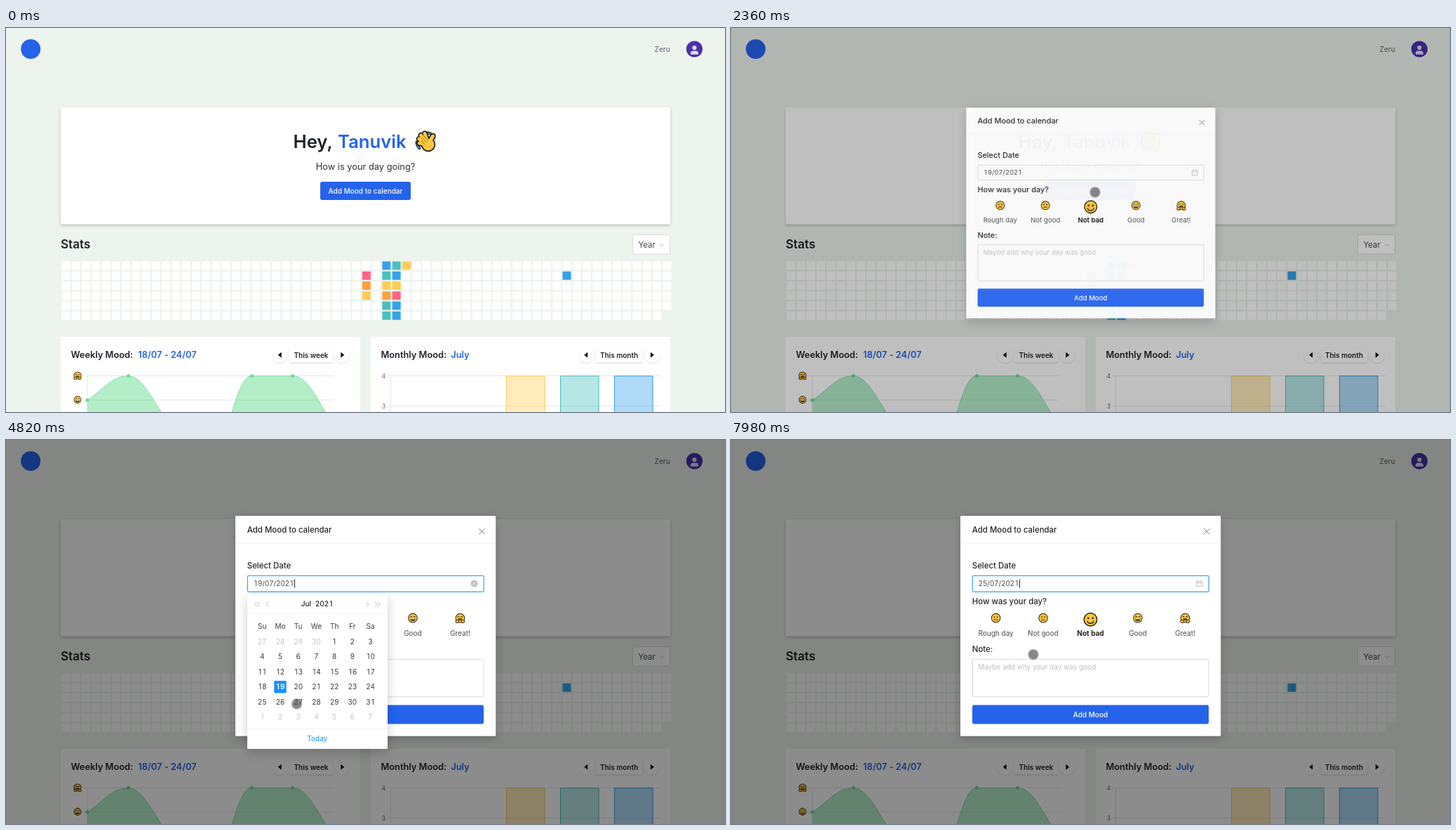
An HTML page with a canvas for the animation above (8 s loop, 1025x547 px).

```html
<!DOCTYPE html>
<html lang="en">
<head>
<meta charset="utf-8">
<title>Mood calendar</title>
<style>
  html, body { margin: 0; width: 100%; height: 100%; overflow: hidden; background: #edf3ed; }
  canvas { display: block; width: 1025px; height: 547px; }
</style>
</head>
<body>
<canvas id="stage" width="1025" height="547"></canvas>
<script>
const ctx = document.getElementById('stage').getContext('2d');
const LOOP = 8000;
const BLUE = '#2563eb', FOCUS = '#1890ff', INK = '#1f2328', DARK = 'rgba(0,0,0,.85)';
const MOOD = { r: '#ff6384', o: '#ff9f40', y: '#ffcd56', t: '#4bc0c0', b: '#36a2eb' };

// ---------- helpers ----------
const clamp = v => Math.max(0, Math.min(1, v));
const smooth = p => p * p * (3 - 2 * p);

function bezier(x1, y1, x2, y2) {
  const at = (a, b, s) => 3 * (1 - s) * (1 - s) * s * a + 3 * (1 - s) * s * s * b + s * s * s;
  return x => {
    if (x <= 0 || x >= 1) return clamp(x);
    let lo = 0, hi = 1;
    for (let i = 0; i < 24; i++) {
      const mid = (lo + hi) / 2;
      if (at(x1, x2, mid) < x) lo = mid; else hi = mid;
    }
    return at(y1, y2, lo);
  };
}
const outCirc = bezier(.08, .82, .17, 1);
const outQuint = bezier(.23, 1, .32, 1);
const inQuint = bezier(.755, .05, .855, .06);

function text(str, x, y, size, weight, color, align = 'left') {
  ctx.font = `${weight} ${size}px Inter, sans-serif`;
  ctx.textAlign = align;
  ctx.fillStyle = color;
  ctx.fillText(str, x, y);
}

// Digits share one advance width.
function digits(str, x, y, weight, color, centered) {
  ctx.font = `${weight} 10px Inter, sans-serif`;
  const wide = ctx.measureText('0').width;
  const widths = [...str].map(c => c === '/' ? ctx.measureText(c).width : wide);
  if (centered) x -= widths.reduce((a, b) => a + b) / 2;
  [...str].forEach((c, i) => {
    text(c, x + widths[i] / 2, y, 10, weight, color, 'center');
    x += widths[i];
  });
}

function box(x, y, w, h, r, fill, shadow) {
  ctx.save();
  if (shadow) {
    [ctx.shadowOffsetY, ctx.shadowBlur] = shadow;
    ctx.shadowColor = `rgba(0,0,0,${shadow[2]})`;
  }
  ctx.fillStyle = fill;
  ctx.beginPath();
  ctx.roundRect(x, y, w, h, r);
  ctx.fill();
  ctx.restore();
}

function frame(x, y, w, h, color, lineWidth = 1) {
  ctx.strokeStyle = color;
  ctx.lineWidth = lineWidth;
  ctx.beginPath();
  ctx.roundRect(x, y, w, h, 1.5);
  ctx.stroke();
}

function line(points, color, width = 1) {
  ctx.strokeStyle = color;
  ctx.lineWidth = width;
  ctx.beginPath();
  points.forEach(([x, y]) => ctx.lineTo(x, y));
  ctx.stroke();
}

function disc(x, y, r, fill) {
  ctx.fillStyle = fill;
  ctx.beginPath();
  ctx.arc(x, y, r, 0, 7);
  ctx.fill();
}

function cross(x, y, r, color, width) {
  line([[x - r, y - r], [x + r, y + r]], color, width);
  line([[x - r, y + r], [x + r, y - r]], color, width);
}

// ---------- emoji ----------
function face(x, y, r, mood) {
  ctx.save();
  ctx.translate(x, y);
  ctx.scale(r / 10, r / 10);
  ctx.lineCap = 'round';
  disc(0, 0, 10, '#2b2418');
  disc(0, 0, 8.5, '#ffc83d');
  const ink = '#33291a';
  if (mood < 3) {
    disc(-3.2, -2, 1.4, ink);
    disc(3.2, -2, 1.4, ink);
    ctx.strokeStyle = ink;
    ctx.lineWidth = 1.6;
    ctx.beginPath();
    if (mood === 0) ctx.arc(0, 7, 4, -2.5, -.64);
    else if (mood === 1) { ctx.moveTo(-3.5, 4); ctx.lineTo(3.5, 4); }
    else ctx.arc(0, .5, 5, .4, 2.74);
    ctx.stroke();
  } else {
    for (const s of [-1, 1]) line([[s * 5, -2], [s * 3.3, -3.6], [s * 1.7, -2]], ink, 1.5);
    ctx.fillStyle = ink;
    ctx.beginPath();
    ctx.arc(0, .8, mood === 3 ? 5.4 : 4, 0, Math.PI);
    ctx.fill();
    if (mood === 3) {
      ctx.fillStyle = '#fff';
      ctx.fillRect(-4.2, 1, 8.4, 1.6);
    } else {
      for (const s of [-1, 1]) {
        disc(s * 6, 7, 4, ink);
        disc(s * 6, 7, 2.7, '#ffb02e');
      }
    }
  }
  ctx.restore();
}

function wave() {
  const tips = [[589.5, 164], [589, 158], [591.5, 153], [597, 150.5], [608.5, 154]];
  ctx.save();
  ctx.lineCap = 'round';
  for (const [color, width] of [['#1b1b1b', 4], ['#3f8fe0', 1.8]]) {
    ctx.strokeStyle = color;
    ctx.lineWidth = width;
    for (const [a, b] of [[-1.35, -.45], [2.35, 3.1]]) {
      ctx.beginPath();
      ctx.arc(598.5, 162, 13, a, b);
      ctx.stroke();
    }
  }
  for (const [color, grow] of [['#1b1b1b', 1.7], ['#ffc83d', 0]]) {
    tips.forEach(p => line([p, [602, 166]], color, 5 + grow * 2));
    disc(602, 166, 8.6 + grow, color);
  }
  const crease = '#8a5a14';
  line([[592, 161], [597, 166]], crease, .9);
  line([[592.5, 156], [599, 162.5]], crease, .9);
  line([[595.5, 153.5], [602, 160]], crease, .9);
  ctx.restore();
}

// ---------- page ----------
function header() {
  disc(35.2, 30, 14, BLUE);
  text('Zeru', 924.5, 34, 10, 500, '#6b7280');
  disc(981.4, 30, 11.6, '#4a30a8');
  disc(981.4, 28, 3.1, '#dcd9f6');
  box(975.8, 32.4, 11.2, 5.4, [4, 4, 1, 1], '#dcd9f6');
}

function hero() {
  box(78, 113, 869, 166.5, 2.5, '#fff', [2, 4, .2]);
  text('Hey,', 409.5, 171, 25.7, 600, INK);
  text('Tanuvik', 473, 171, 25.7, 600, BLUE);
  wave();
  text('How is your day going?', 512.5, 202, 12.84, 400, '#2a2f35', 'center');
  box(448, 219, 129, 26, 3, BLUE);
  text('Add Mood to calendar', 512.5, 236, 10, 500, '#fff', 'center');
}

// One string per row; each mark is a column number and a colour key.
const marks = ['32b 33t 34y', '30r 32t 33b 50b', '30o 32y 33y', '30y 32o 33r', '32t 33b', '32t 33b'];

function stats() {
  text('Stats', 78, 314, 17.1, 600, INK);
  box(893, 294, 54, 28.5, 1.5, '#fff');
  frame(893.5, 294.5, 53, 27.5, '#d9d9d9');
  text('Year', 901.5, 312.5, 11.4, 400, '#45484a');
  line([[931.8, 307.5], [935, 310.9], [938.2, 307.5]], '#bfbfbf');
  const cell = (col, row, color) => box(79.3 + col * 14.283, 332.4 + row * 14.283, 12, 12, .7, color);
  for (let i = 0; i < 365; i++) cell(i < 360 ? i % 60 : 60, i < 360 ? Math.floor(i / 60) : i - 360, '#fff');
  marks.forEach((row, y) => row.split(' ').forEach(m => cell(parseInt(m), y, MOOD[m[2]])));
}

function pager(left, width, label) {
  const right = left + 27 + width;
  for (const [x, s] of [[left, -1], [right, 1]]) {
    box(x - 11, 455, 22, 22, 11, '#fff', [1, 2, .13]);
    ctx.fillStyle = '#111';
    ctx.beginPath();
    ctx.moveTo(x + s * 2.8, 465.7);
    ctx.lineTo(x - s * 2.2, 461.7);
    ctx.lineTo(x - s * 2.2, 469.7);
    ctx.fill();
  }
  box(left + 13.5, 455.5, width, 21, 2.5, '#fff', [1, 2, .18]);
  text(label, left + 13.5 + width / 2, 469.7, 10, 600, INK, 'center');
}

function chartCard(x, title, range, rangeX) {
  box(x, 440, 427, 120, 2.5, '#fff');
  text(title, x + 14.4, 469.8, 12.84, 600, INK);
  text(range, rangeX, 469.8, 12.84, 600, BLUE);
}

function weekly() {
  chartCard(78, 'Weekly Mood:', '18/07 - 24/07', 188.3);
  pager(390.5, 62, 'This week');
  const grid = '#e5e5e5';
  line([[109, 495.5], [467, 495.5]], grid);
  line([[109, 530], [467, 530]], grid);
  line([[115.8, 495], [115.8, 547]], grid);
  const curve = new Path2D('M116 530C136 518 150 495.5 174.5 495.5C197 497 211 536 233 564C252 590 272 633 291.5 633' +
    'C315 600 327 495.5 350 495.5L408.5 495.5C432 495.5 445 535 467 564');
  const area = new Path2D(curve);
  area.lineTo(467, 640);
  area.lineTo(116, 640);
  ctx.fillStyle = 'rgba(104,221,148,.5)';
  ctx.fill(area);
  ctx.strokeStyle = '#83e0a5';
  ctx.lineWidth = 1;
  ctx.stroke(curve);
  for (const [x, y] of [[116, 530], [174.5, 495.5], [350.5, 495.5], [408.5, 495.5]]) disc(x, y, 2.6, '#74dc9a');
  face(102, 495, 5.6, 4);
  face(102, 529.5, 5.4, 3);
}

function monthly() {
  chartCard(520, 'Monthly Mood:', 'July', 634.3);
  pager(827, 67, 'This month');
  [[4, 495.5], [3, 538.5]].forEach(([n, y]) => {
    line([[543, y], [933, y]], '#e5e5e5');
    text(n, 541, y + 3, 8.6, 400, '#666', 'right');
  });
  line([[548.5, 495], [548.5, 547]], '#e5e5e5');
  [MOOD.y, MOOD.t, MOOD.b].forEach((color, i) => {
    const x = 713 + i * 77;
    ctx.save();
    ctx.globalAlpha = .4;
    box(x, 495.5, 55.5, 60, 0, color);
    ctx.restore();
    line([[x + .5, 550], [x + .5, 495.7], [x + 55, 495.7], [x + 55, 550]], color);
  });
}

// ---------- dialog ----------
const OPEN = 2270, CLICK_DATE = 3490, DROP = 3570, PICK = 5975, CLOSE = 6030;
const moods = ['Rough day', 'Not good', 'Not bad', 'Good', 'Great!'];

function caretOn(t) {
  if (t >= PICK) return Math.floor((t - PICK) / 500) % 2 === 0;
  return [CLICK_DATE, 3990, 4490, 4990, 5590].filter(x => t >= x).length % 2 === 1;
}

function dateField(t) {
  const glow = clamp((t - CLICK_DATE) / 250);
  frame(344.5, 193.5, 336.5, 22.5, '#d9d9d9');
  if (glow > 0) {
    ctx.save();
    ctx.globalAlpha = glow;
    frame(343.8, 192.8, 337.9, 23.9, 'rgba(24,144,255,.25)', 1.4);
    frame(344.5, 193.5, 336.5, 22.5, '#40a9ff');
    ctx.restore();
  }
  digits(t < PICK ? '19/07/2021' : '25/07/2021', 352.7, 208.3, 400, '#4a4a4a');
  if (caretOn(t)) line([[411.5, 198.5], [411.5, 210.5]], '#222');
  if (t >= CLICK_DATE + 30 && t < CLOSE + 150) {
    disc(667.6, 204.5, 5, '#bfbfbf');
    cross(667.6, 204.5, 1.8, '#fff', 1);
  } else {
    const gray = '#bdbdbd';
    ctx.strokeStyle = gray;
    ctx.lineWidth = .9;
    ctx.strokeRect(663.6, 201.4, 8, 7.2);
    line([[663.6, 203.8], [671.6, 203.8]], gray, .9);
    line([[665.8, 199.9], [665.8, 202.2]], gray, .9);
    line([[669.4, 199.9], [669.4, 202.2]], gray, .9);
  }
}

function dialog(t) {
  box(327, 108, 371.2, 313.7, 1.5, '#fff', [4, 14, .2]);
  text('Add Mood to calendar', 343.8, 131.8, 11.42, 500, DARK);
  cross(678.3, 130.3, 4, '#777', 1);
  line([[327, 147.3], [698, 147.3]], '#efefef', .8);
  text('Select Date', 343.8, 183.2, 11.42, 500, DARK);
  dateField(t);
  text('How was your day?', 343.8, 234.4, 11.42, 500, DARK);
  moods.forEach((name, i) => {
    const x = 377.6 + i * 67.45, big = i === 2;
    face(x, big ? 255.8 : 253.6, big ? 10 : 6.8, i);
    text(name, x, 279, 10, big ? 700 : 400, big ? '#222' : '#4c4c4c', 'center');
  });
  text('Note:', 343.8, 302, 11.42, 500, DARK);
  frame(344.5, 312.3, 336.5, 53.5, '#d9d9d9');
  text('Maybe add why your day was good', 352.2, 327, 10, 400, '#bfbfbf');
  box(344, 377.5, 337, 27, 2.2, BLUE);
  text('Add Mood', 512.4, 394.9, 10, 500, '#fff', 'center');
}

function chevrons(x, y, dir, count) {
  for (let i = 0; i < count; i++) {
    const mid = x + (i - (count - 1) / 2) * 4;
    line([[mid - dir * 1.8, y - 3.4], [mid + dir * 1.8, y], [mid - dir * 1.8, y + 3.4]], '#b5b5b5', .9);
  }
}

function calendar(t) {
  box(344, 220, 200, 220, 1.5, '#fff', [5, 16, .2]);
  chevrons(358.3, 234.3, -1, 2);
  chevrons(372.6, 234.3, -1, 1);
  chevrons(515.3, 234.3, 1, 1);
  chevrons(529.5, 234.3, 1, 2);
  text('Jul', 420.8, 236.9, 10, 500, DARK);
  digits('2021', 440.8, 236.9, 500, DARK);
  line([[344, 247.6], [544, 247.6]], '#efefef', .8);
  const colX = i => 365.2 + i * 25.73;
  ['Su', 'Mo', 'Tu', 'We', 'Th', 'Fr', 'Sa'].forEach((d, i) => text(d, colX(i), 269, 10, 400, '#3c3c3c', 'center'));
  const chosen = t < PICK ? 19 : 25;
  for (let i = 0; i < 42; i++) {
    const day = i - 3, x = colX(i % 7), y = 291 + Math.floor(i / 7) * 21.45;
    const inside = day >= 1 && day <= 31, on = day === chosen;
    if (on) box(x - 8.7, y - 12.3, 17.4, 17.4, 1, FOCUS);
    else if (day === 19) frame(x - 8.2, y - 11.8, 16.4, 16.4, FOCUS, .8);
    const label = String(day < 1 ? day + 30 : day > 31 ? day - 31 : day);
    digits(label, x, y, on ? 600 : 400, on ? '#fff' : inside ? '#3a3a3a' : '#c4c4c4', true);
  }
  line([[344, 411.4], [544, 411.4]], '#efefef', .8);
  text('Today', 443.8, 429, 10, 400, FOCUS, 'center');
}

// ---------- pointer ----------
const path = [
  [240, 950, 525], [1030, 516.5, 246], [1160, 516.5, 245.5], [1350, 516, 245], [1740, 516, 245],
  [1760, 516, 241], [1870, 519, 234], [2730, 519, 234], [2840, 517.5, 239], [3340, 480, 211],
  [4140, 480, 211], [4930, 411, 385], [4960, 411, 385], [5240, 363, 379], [5400, 363, 379],
  [5450, 363, 378], [5590, 363, 378], [5610, 365, 376.5], [6250, 365, 376.5], [6600, 398, 349],
  [6730, 399, 348], [6990, 399, 348], [7580, 437, 302], [7740, 437, 302], [7980, 431, 305.5]
];

function pointer(t) {
  if (t < path[0][0]) return;
  const next = path.findIndex(k => k[0] > t);
  const b = next < 0 ? path[path.length - 1] : path[next];
  const a = next < 0 ? b : path[next - 1];
  const p = a === b ? 1 : smooth((t - a[0]) / (b[0] - a[0]));
  const x = a[1] + (b[1] - a[1]) * p, y = a[2] + (b[2] - a[2]) * p;
  disc(x, y, 8, 'rgba(70,70,70,.3)');
  disc(x, y, 6.7, 'rgba(60,60,60,.45)');
}

// ---------- loop ----------
function draw(t) {
  ctx.fillStyle = '#edf3ed';
  ctx.fillRect(0, 0, 1025, 547);
  header();
  hero();
  stats();
  weekly();
  monthly();
  if (t > OPEN - 20) {
    ctx.fillStyle = `rgba(0,0,0,${.45 * clamp((t - OPEN + 20) / 200)})`;
    ctx.fillRect(0, 0, 1025, 547);
  }
  if (t > OPEN) {
    const p = outCirc(clamp((t - OPEN) / 200)), s = .2 + .8 * p;
    ctx.save();
    ctx.globalAlpha = p;
    ctx.translate(519, 234);
    ctx.scale(s, s);
    ctx.translate(-519, -234);
    dialog(t);
    ctx.restore();
  }
  const shown = outQuint(clamp((t - DROP) / 200)) * (1 - inQuint(clamp((t - CLOSE) / 200)));
  if (shown > 0) {
    ctx.save();
    ctx.globalAlpha = shown;
    ctx.translate(0, 220);
    ctx.scale(1, .8 + .2 * shown);
    ctx.translate(0, -220);
    calendar(t);
    ctx.restore();
  }
  pointer(t);
}

const start = performance.now();
function tick() {
  draw((performance.now() - start) % LOOP);
  requestAnimationFrame(tick);
}
tick();
</script>
</body>
</html>
```
